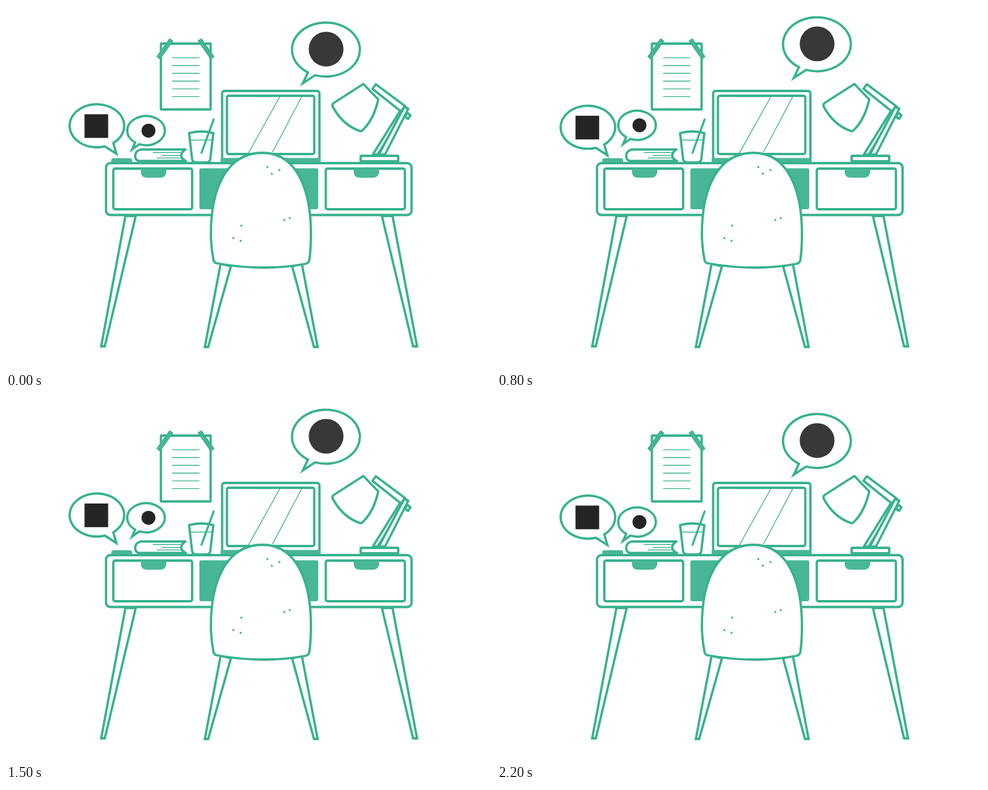
An HTML page that plays this animation: 800 px wide and 600 px high, repeating every 2.3 s.

```html
<!DOCTYPE html>
<html lang="en">
<head>
<meta charset="utf-8">
<title>Desk with floating speech bubbles</title>
<style>
  html, body { margin: 0; width: 100%; height: 100%; overflow: hidden; background: #fff; }
  svg { display: block; width: 100vw; height: 100vh; }
  .line { fill: #fff; stroke: #37b28d; stroke-width: 3.8; stroke-linejoin: round; stroke-linecap: round; }
  .sharp { stroke-linejoin: miter; }
  .thin { fill: none; stroke: #37b28d; stroke-width: 1.4; }
  .solid { fill: #48b797; }
  .dark { fill: #252525; }
</style>
</head>
<body>
<svg viewBox="0 0 800 600">
  <!-- paper -->
  <rect class="line" x="255.5" y="62" width="82" height="108.5" rx="1"/>
  <path class="thin" d="M274 85.4h45m-45 12.8h45m-45 12.8h45m-45 12.8h45m-45 12.8h45m-45 12.8h45"/>
  <g class="solid" stroke="#37b28d" stroke-width="1.5" stroke-linejoin="round">
    <path d="M270 54l5 3.5-21 30-5-4z"/>
    <path d="M322 54l-5 3.5 21 30 5-4z"/>
  </g>

  <!-- laptop -->
  <rect class="line" x="356.5" y="140" width="160.5" height="114" rx="4"/>
  <rect class="line" x="364.5" y="148" width="144" height="96" rx="3"/>
  <path class="thin" d="M452 149L399.5 243M488 149L439.5 241"/>
  <rect class="solid" x="354" y="250.5" width="165" height="9" rx="2"/>

  <!-- lamp -->
  <g class="line">
    <path d="M610 129L659 165.500 651 173.500 604.500 136.500z"/>
    <path d="M650 173L605 245H613L655 177z"/>
    <path d="M662 176L667 180 663.500 186 658 183z"/>
    <path d="M657 166L663.500 169.500 625 245H615z"/>
    <path d="M589.500 128.500L541 159.500Q537 162.500 539 166 555 196 583.500 206 587 207 589.500 203.500 607 186 614 154z"/>
    <rect x="585" y="247" width="62" height="9" rx="1"/>
  </g>

  <!-- phone, book, glass -->
  <path class="solid" d="M173.5 258.5V254Q174 251 177 251H204.5Q208 251 208 254V258.5z"/>
  <path class="line" d="M296 236.5H222Q213 239 213 248 214 255.5 221 255.5H297Q289 252 289 246 290 240 296 236.5"/>
  <path class="thin" d="M242 241.5h48M257 246.5h31M249 250.5h41"/>
  <path class="line" d="M302 209.5Q322 204 342 209.5L337 252Q336 258 330 258H314Q308 258 307 252z"/>
  <path class="thin" d="M303 221h38"/>
  <path class="line" style="stroke-width:3.4" d="M342.5 187L322.5 242"/>

  <!-- desk -->
  <g class="line sharp">
    <path d="M197 346H214L163 561H157z"/>
    <path d="M620 346H637.5L678 561H671.5z"/>
  </g>
  <rect class="line" x="165" y="259" width="504" height="85.5" rx="7"/>
  <rect class="line" x="177" y="268" width="130" height="67" rx="3"/>
  <rect class="line" x="527.5" y="268" width="130.500" height="67" rx="3"/>
  <rect class="solid" x="319" y="267.5" width="196" height="67.5" rx="3"/>
  <g class="solid">
    <path id="handle" d="M222.5 268H264.5V274Q263 283 254 283H233Q223 283 222.5 274z"/>
    <use href="#handle" x="351"/>
  </g>

  <!-- chair -->
  <g class="line sharp">
    <path d="M354 425L371 429 333.500 562H328z"/>
    <path d="M472 429L488 425 514 562H508z"/>
  </g>
  <path class="line" d="M342 417Q338 395 338 375C338 299 365 242 423 242 480 242 503 304 503 375Q503 400 500.5 418 499.5 424 494 425 423 438 347 424 342 422 342 417z"/>
  <path fill="none" stroke="#37b28d" stroke-width="3.4" stroke-linecap="round"
    d="M431 265.5h0M451 270.5h0M438.5 276.5h0M468 349.5h0M459 352.5h0M388 362h0M375 382.5h0M387 387h0"/>

  <!-- bubbles -->
  <g id="left">
    <path class="line sharp" d="M163 231.500A45 35.500 0 1 1 177 225.900L182 243.500z"/>
    <rect class="dark" x="129.500" y="178.500" width="39" height="39"/>
  </g>
  <g id="small">
    <path class="line sharp" d="M220 227.400A31 24 0 1 0 213 224.500L208 236z"/>
    <circle class="dark" cx="235" cy="205" r="11.500"/>
  </g>
  <g id="big">
    <path class="line sharp" d="M510 113.600A56 44.500 0 1 0 498 109.100L489.500 127z"/>
    <circle cx="528" cy="70.700" r="28.700" fill="#383838"/>
  </g>
</svg>
<script>
  const LOOP = 2300, STEP = 100, TRAVEL = 12, REST = 0.4;
  const QUICK = 1100, SLOW = LOOP - QUICK;
  const [left, small, big] = ['left', 'small', 'big'].map(id => document.getElementById(id));

  // Goes 0 to 1 during the first leg, then back to 0 by the end of the loop.
  function wave(t, leg) {
    const p = (t + LOOP) % LOOP;
    return p < leg ? p / leg : (LOOP - p) / (LOOP - leg);
  }
  const moveY = (el, y) => el.setAttribute('transform', `translate(0 ${y.toFixed(2)})`);

  function draw(now) {
    const t = Math.floor((now % LOOP) / STEP) * STEP;
    const rise = REST - TRAVEL * wave(t, QUICK);
    moveY(small, rise);
    moveY(big, rise);
    moveY(left, REST + 5 - TRAVEL * wave(t - 500, SLOW));
    requestAnimationFrame(draw);
  }
  draw(0);
</script>
</body>
</html>
```
